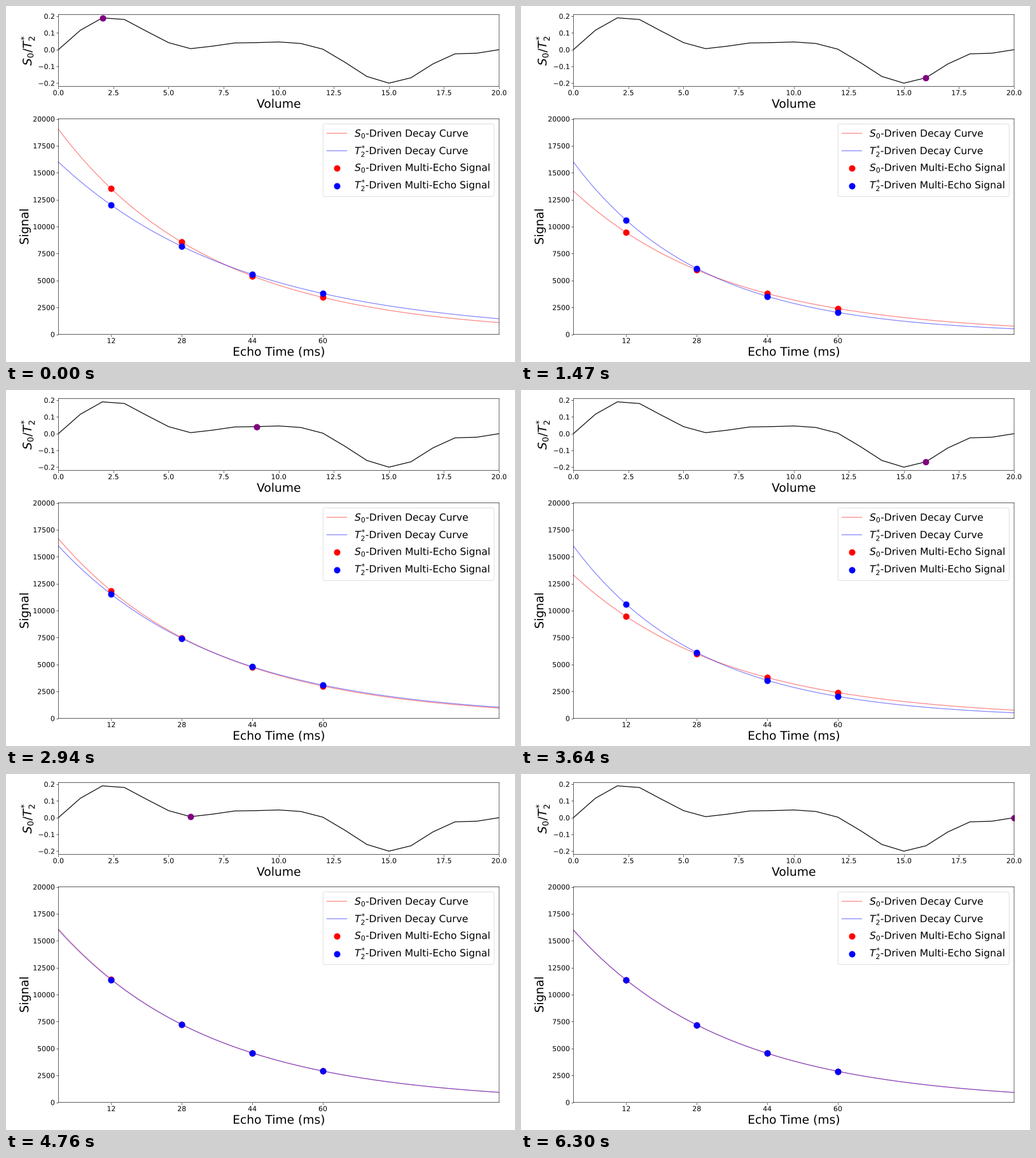
A matplotlib script that plays this animation: 800 by 560 pixels, repeating every 6370 ms.

```python
import numpy as np
import matplotlib.pyplot as plt
from matplotlib import patheffects
from matplotlib.animation import FuncAnimation
from matplotlib.text import Text

WIDTH, HEIGHT, DPI = 800, 560, 80
FRAMES, INTERVAL = 91, 70
K = 0.7  # scale from nominal point sizes to this figure

MEAN_S0, MEAN_T2S = 16000, 35
ECHOES = np.array([12, 28, 44, 60])
TIMES = np.arange(101)
SERIES = np.array([
    0, 0.116, 0.19, 0.18, 0.11, 0.042, 0.006, 0.021, 0.040, 0.042, 0.046,
    0.037, 0.003, -0.075, -0.16, -0.2, -0.168, -0.085, -0.025, -0.021, 0,
])

plt.rcParams.update({
    "font.family": "DejaVu Sans",
    "text.hinting": "none",
    "path.snap": False,
    "axes.linewidth": 0.8 * K,
    "axes.labelsize": 24 * K,
    "axes.labelpad": 4 * K,
    "lines.linewidth": 1.5 * K,
    "legend.fontsize": 20 * K,
    "legend.labelspacing": 0.37,
    "patch.linewidth": 1.0 * K,
})
for axis in ("xtick", "ytick"):
    plt.rcParams.update({
        f"{axis}.labelsize": 14 * K,
        f"{axis}.major.size": 3.5 * K,
        f"{axis}.major.pad": 3.5 * K,
        f"{axis}.major.width": 0.8 * K,
    })

fig = plt.figure(figsize=(WIDTH / DPI, HEIGHT / DPI), dpi=DPI, facecolor="white")


def add_axes(top, bottom, left=82.3, right=775.0):
    """Add axes from pixel edges measured from the top left."""
    return fig.add_axes([left / WIDTH, 1 - bottom / HEIGHT,
                         (right - left) / WIDTH, (bottom - top) / HEIGHT])


def dots(ax, x, y, color, label=None):
    return ax.scatter(x, y, s=130 * K**2, color=color, linewidths=1.5 * K,
                      zorder=2.2, label=label)


def decay(t, s0, t2s):
    return s0 * np.exp(-t / t2s)


def volume(frame):
    """Two volumes advance for every three frames."""
    return (2 + (2 * frame + 2) // 3) % len(SERIES)


names = ("$S_{0}$", "$T_{2}^{*}$")
colors = ("red", "blue")

top_ax = add_axes(13.5, 126.5)
top_ax.plot(SERIES, color="black")
marker = dots(top_ax, [0], [0], "purple")
margin = 0.05 * np.ptp(SERIES)
top_ax.set(xlim=(0, 20), ylim=(SERIES.min() - margin, SERIES.max() + margin),
           xticks=np.arange(0, 20.1, 2.5), yticks=np.linspace(-0.2, 0.2, 5),
           xlabel="Volume", ylabel="/".join(names))

ax = add_axes(177.5, 516.5)
curves = [ax.plot(TIMES, 0 * TIMES, color=c, alpha=0.5,
                  label=f"{n}-Driven Decay Curve")[0]
          for n, c in zip(names, colors)]
echoes = [dots(ax, ECHOES, 0 * ECHOES, c, f"{n}-Driven Multi-Echo Signal")
          for n, c in zip(names, colors)]
ax.set(xlim=(0, 100), ylim=(0, 20000), xticks=ECHOES,
       yticks=np.arange(0, 20001, 2500),
       xlabel="Echo Time (ms)", ylabel="Signal")
ax.legend(loc="upper right")

# Outline text keeps its exact subpixel position.
for text in fig.findobj(Text):
    text.set_path_effects([patheffects.Normal()])


def update(frame):
    vol = volume(frame)
    change = 1 + SERIES[vol]
    marker.set_offsets([[vol, SERIES[vol]]])
    params = ((MEAN_S0 * change, MEAN_T2S), (MEAN_S0, MEAN_T2S * change))
    for curve, echo, (s0, t2s) in zip(curves, echoes, params):
        curve.set_ydata(decay(TIMES, s0, t2s))
        echo.set_offsets(np.column_stack([ECHOES, decay(ECHOES, s0, t2s)]))
    return [marker, *curves, *echoes]


anim = FuncAnimation(fig, update, frames=FRAMES, interval=INTERVAL,
                     repeat=True, repeat_delay=0, blit=False)
plt.show()
```
